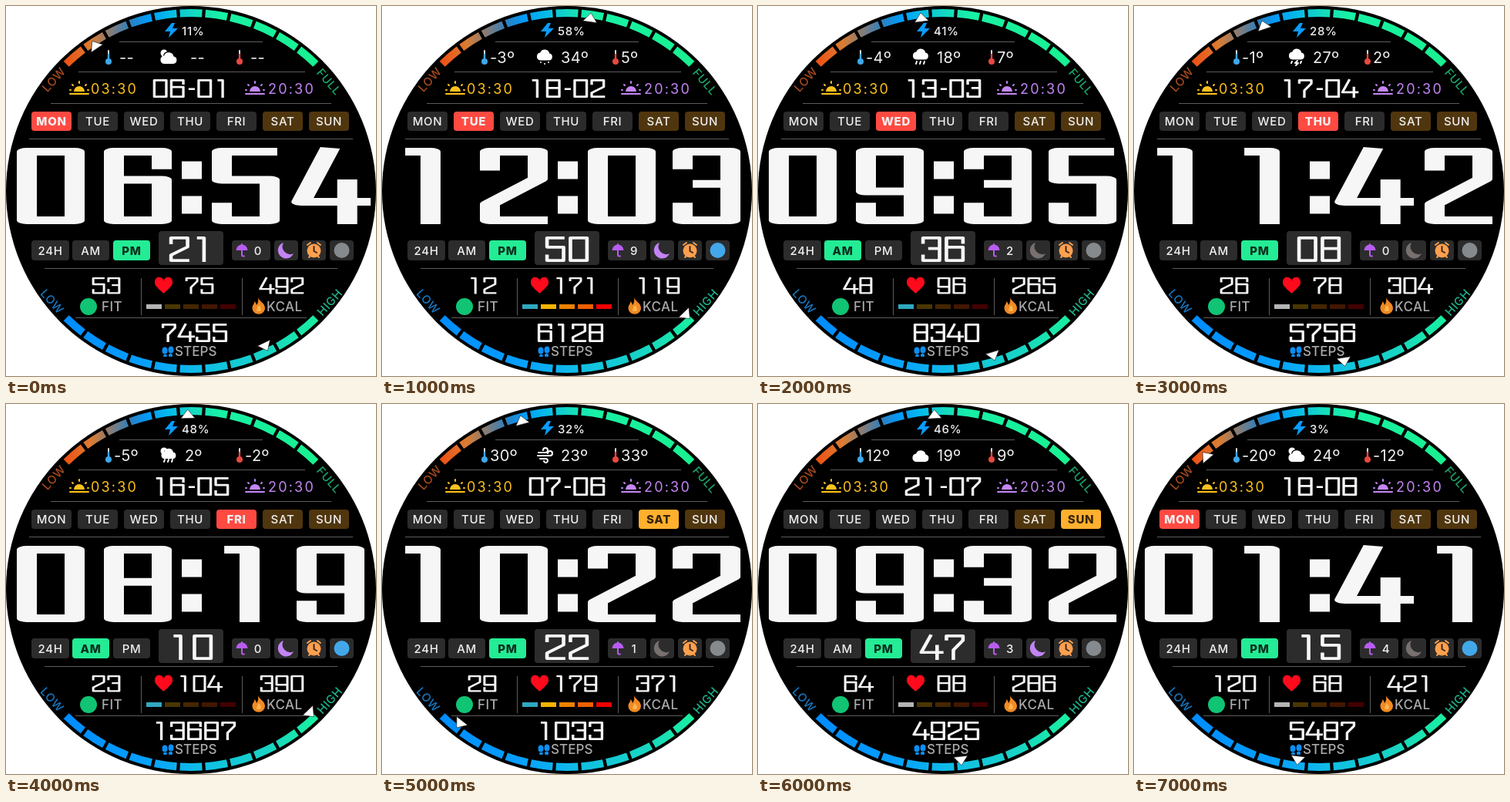
An HTML page for the animation above (8 s loop, 480 by 480 pixels).

```html
<!DOCTYPE html>
<html lang="en">
<head>
<meta charset="utf-8">
<title>Watch face</title>
<style>
  html, body { margin: 0; width: 100%; height: 100%; overflow: hidden; background: #fff; }
  svg { display: block; width: 480px; height: 480px; }
  text { font: 500 15px Inter, "DejaVu Sans", sans-serif; fill: #f0f0f0; text-anchor: middle; letter-spacing: .7px; }
  .left { text-anchor: start; }
  .on { font-weight: 800; }
  .num { fill: none; stroke: #f6f6f6; stroke-width: 1; stroke-linejoin: round; stroke-linecap: square; }
  .rule { stroke: #5c5c5c; fill: none; }
  .ring { fill: none; stroke-width: 10; stroke-dasharray: 8.7 1.3; stroke-dashoffset: -.65; }
  .unit { font-size: 17px; fill: #a9a9a9; letter-spacing: .4px; }
  .temp { font-size: 20px; font-weight: 400; letter-spacing: .4px; }
  .sun { font-size: 18px; font-weight: 400; letter-spacing: 2.2px; text-anchor: start; }
  .ico { fill: none; stroke: currentColor; stroke-width: 2; stroke-linecap: round; stroke-linejoin: round; }
</style>
</head>
<body>
<svg viewBox="0 0 480 480">
  <defs>
    <linearGradient id="power" gradientUnits="userSpaceOnUse" x1="77" x2="403">
      <stop offset="0" stop-color="#ee5014"/><stop offset=".1" stop-color="#dc7c32"/>
      <stop offset=".19" stop-color="#7a7c80"/><stop offset=".26" stop-color="#2c80c0"/>
      <stop offset=".33" stop-color="#009cfc"/><stop offset=".42" stop-color="#06bde6"/>
      <stop offset=".52" stop-color="#16dcbc"/><stop offset=".62" stop-color="#18f2a4"/>
      <stop offset="1" stop-color="#18f090"/>
    </linearGradient>
    <linearGradient id="goal" gradientUnits="userSpaceOnUse" x1="77" x2="403">
      <stop offset="0" stop-color="#008cff"/><stop offset=".3" stop-color="#069eff"/>
      <stop offset=".55" stop-color="#10bee6"/><stop offset=".8" stop-color="#18d4c4"/>
      <stop offset="1" stop-color="#18f0a0"/>
    </linearGradient>
    <g id="halfsun">
      <path d="M-7 4a7 7 0 0 1 14 0z" fill="currentColor"/>
      <path class="ico" d="M-12 7H12M-11 2l-1 0M11 2l1 0M-8-4l-1-1M8-4l1-1M0-7v-2"/>
    </g>
    <g id="thermo">
      <path class="ico" d="M0 4V-8" stroke-width="4" style="color:#d8d8d8"/>
      <path d="M0 5V-4" stroke="currentColor" stroke-width="2.4"/>
      <circle cy="6" r="4" fill="currentColor"/>
    </g>
    <path id="cloud" d="M-6 9H6a4.8 4.8 0 0 0 .5-9.5A6.5 6.5 0 0 0-6-1.5A5.3 5.3 0 0 0-6 9z" fill="#fff"/>
    <path id="tip" d="M0-6L9 5.500H-9z" fill="#fff" stroke="#222" stroke-width=".6"/>
  </defs>

  <circle cx="240" cy="240" r="240"/>
  <path class="ring" stroke="url(#power)" pathLength="110" d="M76.700 76.700A231 231 0 0 1 403.300 76.700"/>
  <path class="ring" stroke="url(#goal)" pathLength="110" d="M403.300 403.300A231 231 0 0 1 76.700 403.300"/>
  <path class="rule" d="M147 46.500H333M94 85.500H388M58 126.500H422M30 172.500H450M50 340.500H430M90 404.500H390M175.500 353V401M306.500 353V401"/>

  <text transform="translate(66 99) rotate(-48)" style="fill:#a84a1c">LOW</text>
  <text transform="translate(415 102) rotate(49)" style="fill:#1ba468">FULL</text>
  <text transform="translate(56 387) rotate(48)" style="fill:#1478c4">LOW</text>
  <text transform="translate(424 388) rotate(-48)" style="fill:#1ab48c">HIGH</text>

  <path d="M215 22L206 33H213L211 41L223 29H216L219 22z" fill="#0a9cff"/>
  <use href="#thermo" x="133" y="66" style="color:#3fa8e8"/>
  <use href="#thermo" x="303" y="66" style="color:#e84840"/>
  <g style="color:#ffc21c"><use href="#halfsun" x="95" y="107"/><text class="sun" x="110" y="114" style="fill:#ffc21c">03:30</text></g>
  <g style="color:#c486f4"><use href="#halfsun" x="323" y="107"/><text class="sun" x="340" y="114" style="fill:#c486f4">20:30</text></g>

  <path d="M228 201.500h26v23h-26zM228 246.500h26v23h-26z" fill="#f6f6f6"/>
  <rect x="198" y="292" width="84" height="44" rx="4" fill="#2c2c2c"/>
  <g fill="#2c2c2c">
    <rect x="293" y="304" width="50" height="26" rx="4"/><rect x="348" y="304" width="31" height="26" rx="4"/>
    <rect x="384" y="304" width="31" height="26" rx="4"/><rect x="420" y="304" width="31" height="26" rx="4"/>
  </g>
  <g style="color:#b75cf0">
    <path d="M298.500 317a7.500 7.500 0 0 1 15 0z" fill="currentColor"/>
    <path class="ico" d="M306 309V323q0 2 3 1.500" stroke-width="1.800"/>
  </g>
  <g style="color:#ffa04e">
    <circle cx="399.500" cy="317.500" r="9" fill="currentColor"/>
    <path class="ico" d="M391 310l4-3M408 310l-4-3M393 326l2-2M406 326l-2-2" stroke-width="3"/>
    <path class="ico" d="M399.500 312V318L403 320" style="color:#3a2a1c"/>
  </g>

  <circle cx="107" cy="390" r="11" fill="#10c474"/>
  <text class="unit left" x="124" y="396">FIT</text>
  <path d="M204.500 373C197 366 193 363 193 358.500A5.800 5.800 0 0 1 204.500 356.500A5.800 5.800 0 0 1 216 358.500C216 363 212 366 204.500 373z" fill="#ff0a1c"/>
  <path d="M327 378C329 384 336 385 336 392A8 7.500 0 0 1 319.500 392C319.500 387 323 387 322 383Q325 385 325 388Q328 384 327 378z" fill="#f08a24"/>
  <path d="M328 388q4 4 2.500 8h-5q-1-3 2.500-8z" fill="#ffb54c"/>
  <text class="unit left" x="338" y="396">KCAL</text>
  <g fill="#0a90f4">
    <ellipse cx="206" cy="447" rx="3.500" ry="4.500"/><rect x="204" y="452" width="5" height="3" rx="1.500"/>
    <ellipse cx="214" cy="446" rx="3.500" ry="4.500"/><rect x="211" y="451" width="5" height="4" rx="1.500"/>
  </g>
  <text class="unit left" x="219" y="454" style="letter-spacing:.1px">STEPS</text>
  <g id="live"></g>
</svg>

<script>
const DAYS = ['MON', 'TUE', 'WED', 'THU', 'FRI', 'SAT', 'SUN'];
const BARS = ['#30a8c0', '#f4b400', '#ec8200', '#ee6000', '#f40000'];
const DIM = ['#b4b4b4', '#4a3600', '#452600', '#431700', '#440000'];

// Digit centre lines in a unit box
const DIGITS = [
  'M0 0H1V1H0Z',
  'M.26 0H.58V1',
  'M0 .22V0H1V.4L0 .76V1H1',
  'M0 .2V0H1V1H0V.8M.42 .47H1',
  'M.45 0L-.11 .73H1.13M.85 .46V1',
  'M.95 0H0V.41H1V1H0V.8',
  'M1 .2V0H0V1H1V.41H0',
  'M0 .14V0H1V.2L.42 .62V1',
  'M0 0H1V1H0ZM0 .47H1',
  'M0 .8V1H1V0H0V.58H1'
];

const state = (day, time, sec, date, power, temps, sky, rain, flags, fit, pulse, kcal, steps, goal) =>
  ({ day, time, sec, date, power, temps, sky, rain, flags, fit, pulse, kcal, steps, goal });

// flags: a = morning, m = moon, w = wireless
const STATES = [
  state(0, '0654', '21', '06-01', 11, ['--', '--', '--'], 'fair', 0, 'm', '53', 75, '492', '7455', 25.6),
  state(1, '1203', '50', '18-02', 58, ['-3º', '34º', '5º'], 'snow', 9, 'mw', '12', 171, '119', '6128', 43.9),
  state(2, '0935', '36', '13-03', 41, ['-4º', '18º', '7º'], 'rain', 2, 'a', '48', 96, '265', '8340', 17),
  state(3, '1142', '08', '17-04', 28, ['-1º', '27º', '2º'], 'storm', 0, '', '26', 78, '304', '5756', 8.4),
  state(4, '0819', '10', '16-05', 48, ['-5º', '2º', '-2º'], 'shower', 0, 'amw', '23', 104, '390', '13687', 43.9),
  state(5, '1022', '22', '07-06', 32, ['30º', '23º', '33º'], 'wind', 1, '', '29', 179, '371', '1033', -38.5),
  state(6, '0932', '47', '21-07', 46, ['12º', '19º', '9º'], 'cloud', 3, 'm', '64', 88, '286', '4925', 6),
  state(0, '0141', '15', '18-08', 3, ['-20º', '24º', '-12º'], 'fair', 4, 'w', '120', 68, '421', '5487', -7.1)
];

// Scale the path so its round pen becomes px wide and py tall
function glyph(ch, x, y, w, h, px, py) {
  const W = (w - px) / px, H = (h - py) / py;
  let axis = '', pair = 0;
  const d = DIGITS[ch].replace(/[MLHVZ]|-?[\d.]+/g, t => {
    if (/[A-Z]/.test(t)) { axis = t; pair = 0; return t; }
    const isX = axis === 'H' || (axis !== 'V' && pair++ % 2 === 0);
    return ' ' + (t * (isX ? W : H)).toFixed(3);
  });
  return `<path d="${d}" transform="translate(${x + px / 2} ${y + py / 2}) scale(${px} ${py})"/>`;
}

function number(s, cx, y, h) {
  const w = .79 * h, step = .92 * h, dash = .56 * h;
  const width = [...s].reduce((sum, c) => sum + (c === '-' ? dash : step), w - step);
  let x = cx - width / 2, out = '';
  for (const c of s) {
    if (c === '-') out += `<path d="M${x + 2} ${y + h * .53}h${h * .34}" stroke-width="2.6" stroke-linecap="butt"/>`;
    else out += glyph(c, x, y, w, h, .14 * h, .11 * h);
    x += c === '-' ? dash : step;
  }
  return `<g class="num" aria-label="${s}">${out}</g>`;
}

const text = (s, x, y, cls = '', fill = '#f0f0f0') =>
  `<text x="${x}" y="${y}" class="${cls}" style="fill:${fill}">${s}</text>`;

const pill = (s, x, y, w, h, fill, ink, on) =>
  `<rect x="${x}" y="${y}" width="${w}" height="${h}" rx="4" fill="${fill}"/>` +
  text(s, x + w / 2, y + h / 2 + 5.5, on ? 'on' : '', ink);

const tip = (angle, r) =>
  `<use href="#tip" transform="rotate(${angle} 240 240) translate(240 ${240 - r})"/>`;

function weather(kind) {
  const line = d => `<path class="ico" style="color:#fff" d="${d}"/>`;
  const cloud = (y, s = 1) => `<use href="#cloud" transform="translate(211 ${y}) scale(${s})"/>`;
  const sun = '<circle cx="205" cy="61" r="4.5" fill="#fff"/><circle cx="210" cy="65" r="6" fill="#000"/>';
  const drops = line('M206 72l-1 3M211 72l-1 3M216 72l-1 3');
  return {
    fair: () => sun + cloud(66),
    cloud: () => cloud(66),
    snow: () => cloud(62, .95) + line('M206 73v0M211 75v0M216 73v0'),
    rain: () => cloud(61, .95) + drops,
    storm: () => cloud(61, .95) + line('M205 72l-1 2M217 72l-1 2M212 71l-3 3h4l-3 3'),
    shower: () => sun + cloud(63, .9) + drops,
    wind: () => line('M203 63h9a3 3 0 1 0-3-3M202 67h16a3 3 0 1 0-3-3M205 71h7a2.500 2.500 0 1 1-2 3')
  }[kind]();
}

function draw(s) {
  const has = f => s.flags.includes(f);
  const week = DAYS.map((d, i) => {
    const on = i === s.day, end = i > 4;
    const fill = end ? (on ? '#ffb02e' : '#50360e') : (on ? '#ff4a42' : '#2b2b2b');
    return pill(d, 33 + 60 * i, 137, 52, 25, fill, on && end ? '#36240a' : '#f0f0f0', on);
  }).join('');
  const half = (label, x, on) => pill(label, x, 304, 48, 26, on ? '#24ec94' : '#2c2c2c', on ? '#0a3020' : '#f0f0f0', on);
  const lit = s.pulse > 160 ? 5 : s.pulse > 90 ? 1 : 0;
  const bars = BARS.map((c, i) =>
    `<rect x="${182 + 24 * i}" y="387" width="20" height="6" fill="${i < lit ? c : DIM[i]}"/>`).join('');
  const cells = [14, 127, 267, 377];
  const time = [...s.time].map((c, i) => glyph(c, cells[i], 184, 88, 99, 26, 10)).join('');
  const temps = s.temps.map((t, i) => text(t, [140, 232, 310][i] + (t === '--' ? 7 : 0), 74, 'temp left')).join('');

  return tip(-43 + .874 * s.power, 227) + tip(180 - s.goal, 224) +
    text(s.power + '%', 228, 38, 'left" font-size="18') + temps + weather(s.sky) +
    number(s.date, 240, 95, 24) + week +
    `<g class="num" aria-label="${s.time}">${time}</g>` +
    pill('24H', 33, 304, 49, 26, '#2c2c2c', '#f0f0f0') +
    half('AM', 86, has('a')) + half('PM', 139, !has('a')) +
    number(s.sec, 240, 299, 33) + text(s.rain, 327, 323) +
    `<path d="M360 307a10.500 10.500 0 1 0 13 14a10 10 0 0 1-13-14z" fill="${has('m') ? '#c384f4' : '#77706f'}"/>` +
    `<circle cx="435.500" cy="317" r="10" fill="${has('w') ? '#42a8ea' : '#858a8e'}"/>` +
    number(s.fit, 130, 352, 21.5) + number(String(s.pulse), 251, 352, 21.5) +
    number(s.kcal, 358, 352, 21.5) + bars + number(s.steps, 244.5, 412, 24);
}

const live = document.getElementById('live');
let shown = -1;
function tick() {
  const i = Math.floor(performance.now() / 1000) % STATES.length;
  if (i !== shown) live.innerHTML = draw(STATES[shown = i]);
  requestAnimationFrame(tick);
}
tick();
</script>
</body>
</html>
```
